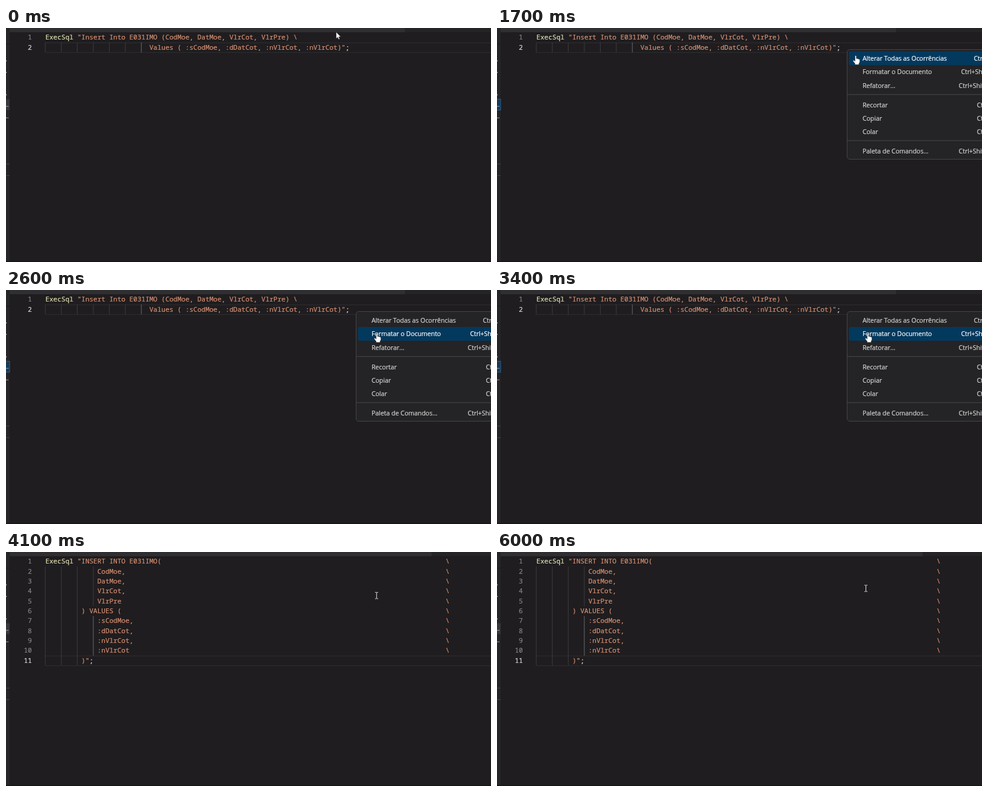
These frames come from a looping animation (800 px wide and 386 px high, 6100 ms). An HTML page:

```html
<!DOCTYPE html>
<html lang="pt">
<head>
<meta charset="utf-8">
<title>Formatar SQL</title>
<style>
  html, body { margin: 0; width: 100%; height: 100%; overflow: hidden; background: #1f1d1f; }
  svg { display: block; width: 100vw; height: 100vh; }
  text { white-space: pre; fill: currentColor; stroke: currentColor; stroke-width: .2; }
  .code { font: 11px "Noto Sans Mono", monospace; color: #d68f72; }
  .fn { color: #dfdfb0; }
  .end { color: #e2e2e2; }
  .num { color: #858585; text-anchor: end; }
  .num.on { color: #d8d8d8; }
  .ui { font: 10.47px "Open Sans", "Noto Sans", sans-serif; color: #d6d6d6; }
  .ui.on { color: #ffffff; }
  .dots { font: 10px "Open Sans", sans-serif; color: #cccccc; }
</style>
</head>
<body>
<svg id="stage" viewBox="0 0 800 386" preserveAspectRatio="none">
  <rect width="800" height="386" fill="#1f1d1f"/>
  <rect x="6" width="794" height="7" fill="#242325"/>
  <rect id="strip" x="6" width="652" height="7" fill="#2f2e31"/>
  <rect id="progress" x="775" y="4" width="25" height="2" fill="#343336"/>
  <rect id="side" width="6" height="386" fill="#262527"/>
  <rect y="26" width="6" height="1" fill="#19181a"/>
  <rect id="row" x="-20" y="117.5" width="26" height="18" fill="#38373b"/>
  <path d="M0 224.5H6M0 243.5H6" stroke="#454447"/>
  <g id="dots" class="dots"></g>
  <rect y="384.5" width="800" height="1.5" fill="#161517"/>
  <g id="before"></g>
  <g id="after"></g>
  <rect id="caret" x="143.6" y="171.5" width="1.3" height="15.5" fill="#d8d8d8"/>
  <g id="menu"></g>
  <path id="arrow" d="M0 0V11.2L2.5 8.9L4.2 12.6L6 11.8L4.4 8.2H7.9Z" fill="#fff" stroke="#111" stroke-width=".6"/>
  <path id="beam" d="M-2.5 -5.2H-.7L0 -4.7L.7 -5.2H2.5M0 -4.7V4.7M-2.5 5.2H-.7L0 4.7L.7 5.2H2.5" fill="none" stroke="#e4e4e4"/>
  <path id="hand" d="M-.5 .4Q.7 -1.1 1.8 .4V4.7Q3.1 3.9 3.8 5.1Q5.1 4.5 5.8 5.7Q7.3 5.3 7.4 6.9V10.4L6 13V14.8H-.5V13.1L-3.8 8.7Q-3.9 7 -2.3 7.5L-.5 9Z" fill="#fff" stroke="#222" stroke-width=".6"/>
</svg>
<script>
const LOOP = 6100, STEP = 100;
const PITCH = 6.6, LEFT = 64.9, ROW = 16.34, TOP = 7.5;
const $ = id => document.getElementById(id);

function add(parent, tag, attrs, text) {
  const el = document.createElementNS("http://www.w3.org/2000/svg", tag);
  for (const key in attrs) el.setAttribute(key, attrs[key]);
  if (text) el.textContent = text;
  parent.append(el);
  return el;
}

const col = n => LEFT + n * PITCH;
const rowTop = n => TOP + n * ROW;

function write(g, row, column, text, cls = "") {
  add(g, "text", { class: "code " + cls, x: col(column), y: rowTop(row) + 11.9 }, text);
}

function guide(g, column, from, to, active) {
  add(g, "rect", {
    x: col(column) - .6, y: rowTop(from), width: 1,
    height: (to - from) * ROW, fill: active ? "#69686a" : "#3d3c3e"
  });
}

function gutter(g, count) {
  for (let i = 1; i <= count; i++) {
    const cls = i === count ? "code num on" : "code num";
    add(g, "text", { class: cls, x: 42.6, y: rowTop(i - 1) + 11.9 }, String(i));
  }
  for (const n of [count - 1, count])
    add(g, "rect", { x: LEFT, y: Math.round(rowTop(n)), width: 800 - LEFT, height: 1, fill: "#2d2c2e" });
}

function buildBefore(g) {
  gutter(g, 2);
  for (let c = 0; c <= 24; c += 4) guide(g, c, 1, 2, c === 24);
  write(g, 0, 0, "ExecSql", "fn");
  write(g, 0, 8, '"Insert Into E031IMO (CodMoe, DatMoe, VlrCot, VlrPre) \\');
  write(g, 1, 26, 'Values ( :sCodMoe, :dDatCot, :nVlrCot, :nVlrCot)"');
  write(g, 1, 75, ";", "end");
}

function buildAfter(g) {
  gutter(g, 11);
  for (const c of [0, 4, 8]) guide(g, c, 1, 11);
  guide(g, 12, 1, 5);
  guide(g, 12, 6, 10, true);
  write(g, 0, 0, "ExecSql", "fn");
  write(g, 0, 8, '"INSERT INTO E031IMO(');
  ["CodMoe,", "DatMoe,", "VlrCot,", "VlrPre"].forEach((s, i) => write(g, i + 1, 13, s));
  write(g, 5, 9, ") VALUES (");
  [":sCodMoe,", ":dDatCot,", ":nVlrCot,", ":nVlrCot"].forEach((s, i) => write(g, i + 6, 13, s));
  write(g, 10, 9, ')"');
  write(g, 10, 11, ";", "end");
  for (let i = 0; i < 10; i++) write(g, i, 100, "\\");
}

const ITEMS = [
  ["Alterar Todas as Ocorrências", 50, "Ctrl+F2", 786.4],
  ["Formatar o Documento", 72.4, "Ctrl+Shift+F", 765.4],
  ["Refatorar...", 95, "Ctrl+Shift+R", 761.6],
  ["Recortar", 126.6, "Ctrl+X", 791.4],
  ["Copiar", 148.8, "Ctrl+C", 791.4],
  ["Colar", 171, "Ctrl+V", 791.4],
  ["Paleta de Comandos...", 202.8, "Ctrl+Shift+P", 761.6]
];
let hover;
const labels = [];

function buildMenu(g) {
  add(g, "rect", { x: 577.5, y: 35.5, width: 240, height: 181, rx: 4.5, fill: "#242325", stroke: "#454446" });
  hover = add(g, "rect", { x: 580.5, width: 230, height: 22.8, rx: 3, fill: "#04395e" });
  for (const y of [109.3, 185.3])
    add(g, "rect", { x: 578, y, width: 222, height: 1, fill: "#49484a" });
  for (const [name, y, keys, x] of ITEMS) {
    labels.push([
      add(g, "text", { class: "ui", x: 602.9, y: y + 3.9 }, name),
      add(g, "text", { class: "ui", x, y: y + 3.9 }, keys)
    ]);
  }
}

// Pointer path: time, x, y
const PATH = [
  [0, 544.5, 6.5], [600, 579, 34], [1400, 579, 34], [2000, 603, 57.5],
  [2200, 603, 57.5], [2600, 611, 71.8], [5400, 611.5, 71.8], [6000, 608.5, 60]
];
const ease = u => u * u * (3 - 2 * u);

function pointer(t) {
  const i = PATH.findIndex(p => p[0] > t);
  if (i < 0) return PATH[PATH.length - 1].slice(1);
  const [t0, x0, y0] = PATH[i - 1], [t1, x1, y1] = PATH[i];
  const u = ease((t - t0) / (t1 - t0));
  return [x0 + (x1 - x0) * u, y0 + (y1 - y0) * u];
}

const show = (id, on) => $(id).setAttribute("visibility", on ? "visible" : "hidden");

function draw(t) {
  const done = t >= 3500, open = t >= 1400 && !done;
  const [x, y] = pointer(t);
  show("before", !done);
  show("after", done);
  show("menu", open);
  show("caret", done && (t - 3500) % 1000 < 500);
  show("progress", done && t < 3700);
  $("strip").setAttribute("width", done ? 696 : 652);
  $("row").setAttribute("fill", open ? "#183a57" : "#38373b");
  $("row").setAttribute("stroke", open ? "#28618f" : "none");

  const pick = !open || y < 39 ? -1 : y < 61.3 ? 0 : 1;
  hover.setAttribute("visibility", pick < 0 ? "hidden" : "inherit");
  if (pick >= 0) hover.setAttribute("y", ITEMS[pick][1] - 11.4);
  labels.forEach((pair, i) => pair.forEach(el => el.classList.toggle("on", i === pick)));

  const shape = open ? (pick < 0 ? "arrow" : "hand") : y < 8 ? "arrow" : "beam";
  for (const id of ["arrow", "beam", "hand"]) show(id, id === shape);
  $(shape).setAttribute("transform", `translate(${x} ${y})`);
}

for (const [y, s] of [[55, "."], [74, "."], [111, "."], [130, ".."], [149, ".."]])
  add($("dots"), "text", { x: -.8, y }, s);
buildBefore($("before"));
buildAfter($("after"));
buildMenu($("menu"));

const start = performance.now();
function tick() {
  const t = (performance.now() - start) % LOOP;
  draw(Math.floor(t / STEP) * STEP);
  requestAnimationFrame(tick);
}
tick();
</script>
</body>
</html>
```
